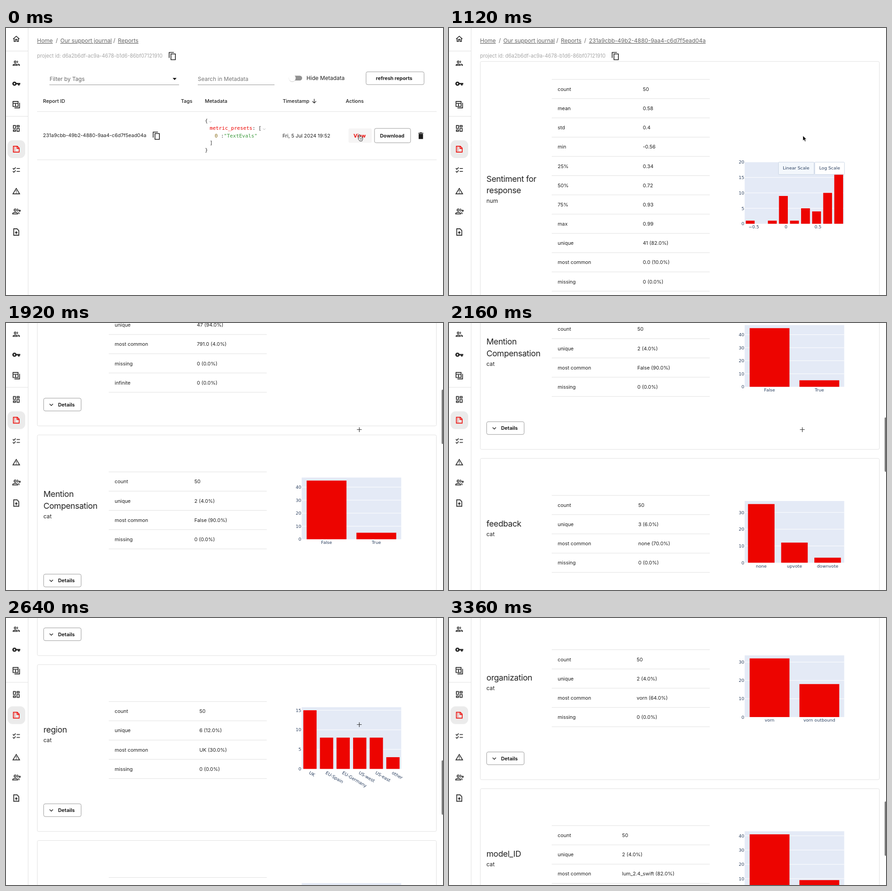
Recreate the animation shown at these times as an HTML page. Size 957x585 px, loop 3440 ms.

```html
<!DOCTYPE html>
<html lang="en">
<head>
<meta charset="utf-8">
<title>Reports</title>
<style>
  html, body { margin: 0; width: 100%; height: 100%; overflow: hidden; background: #fff; }
  svg { display: block; }
  text { font: 10.9px Inter, sans-serif; fill: #212121; white-space: pre; }
  .body { font-size: 12.1px; }
  .crumb { font-size: 12.3px; fill: #666; }
  .link { text-decoration: underline; }
  .id { font-size: 11.05px; fill: #a6a6a6; }
  .head { font-weight: 500; }
  .bold { font-weight: 700; }
  .title { font-size: 17.9px; letter-spacing: -.35px; }
  .sub { font-size: 12.2px; }
  .code { font: 11.1px "DejaVu Sans Mono", monospace; }
  .tick { font: 9.5px "DejaVu Sans", sans-serif; fill: #2a3f5f; }
  .hover { font: 10.3px "Liberation Sans", sans-serif; fill: #fff; }
  .mid { text-anchor: middle; }
  .end { text-anchor: end; }
  .rule { stroke: #e0e0e0; }
  .box { fill: none; stroke: #e0e0e0; }
  .button { fill: #fff; stroke: #999; }
  .icon { fill: none; stroke: #1c1c1c; stroke-width: 2; }
  .solid { fill: #1c1c1c; stroke: none; }
</style>
</head>
<body>
<svg id="stage" width="957" height="585" viewBox="0 0 957 585"></svg>
<script>
const LOOP = 3440, STEP = 80, OPEN = 1120, SCROLL_START = 1440;
const RED = '#ed0400', ROW = 42.18, GAP = 19.7;
const REPORT = '231a9cbb-49b2-4880-9aa4-c6d7f5ead04a';

const text = (x, y, str, cls = '', extra = '') => `<text x="${x}" y="${y}" class="${cls}" ${extra}>${str}</text>`;
const rect = (x, y, w, h, extra) => `<rect x="${x}" y="${y}" width="${w}" height="${h}" ${extra}/>`;
const rule = (x1, x2, y, extra = '') => `<path class="rule" d="M${x1} ${y}H${x2}" ${extra}/>`;
const path = (d, extra = '') => `<path d="${d}" ${extra}/>`;
const icon = (cx, cy, body, extra = '', scale = .7955) =>
  `<g class="icon" transform="translate(${cx - 12 * scale} ${cy - 12 * scale}) scale(${scale})" ${extra}>${body}</g>`;
const button = (x, y, w, h, label, tx) =>
  rect(x, y, w, h, 'rx="3.5" class="button"') + text(tx, y + h / 2 + 4, label, 'bold');

const copyIcon = path('M3 17V2h13M8 6h12v16H8z');

// Sidebar
const sideIcons = [
  [24, path('M3.5 12L12 4.4 20.5 12M6 10.5V19h4v-6h4v6h4v-8.5')],
  [77, '<circle cx="9" cy="8.5" r="2.5"/>' + path('M3 18v-.8c0-1.7 4-2.5 6-2.5s6 .8 6 2.5v.8zM14 6a2.6 2.6 0 0 1 0 5M16.5 14.7c2.5.5 4.5 1.3 4.5 3.3h-3')],
  [122, '<circle cx="7" cy="12" r="4" stroke-width="3.6"/>' + path('M12 10H23v4h-2v3h-4v-3h-5z', 'class="solid"')],
  [168, path('M3 3h14v14H3zM3 8.5h14M10 8.5V17M21 7v14H7')],
  [220, path('M4 4h6v8H4zM14 4h6v4h-6zM4 16h6v4H4zM14 12h6v8h-6z')],
  [265.5, path('M4 4h11l5 5v11H4zM14 4v6h6M7 8h2M7 12h2M7 16h2'), `style="stroke:${RED}"`],
  [311, path('M2.5 7.5l2.8 2.8 5-5M2.5 15.5l2.8 2.8 5-5M13 8h9M13 16h9')],
  [357, path('M12 5L2.8 20h18.4zM12 10v4M12 16v2')],
  [402, '<circle cx="9" cy="8" r="3"/>' + path('M2 19v-1.3c0-2 4.500-3 7-3s7 1 7 3V19zM14 5a3 3 0 0 1 0 6M17.500 14.500c1.500.6 2.500 1.600 2.500 4.500M18.500 10h6M21.500 7v6')],
  [447, path('M5 3h9l5 5v13H5zM12 18v-6M8.700 14.500L12 11.200l3.300 3.300')],
];
const sidebar = rule(0, 48, 50.5) + rule(0, 48, 193.5) +
  rect(3.5, 246, 38.5, 39, 'rx="11" fill="#ebebeb"') +
  sideIcons.map(([y, body, extra]) => icon(22.5, y, body, extra)).join('');

// Header shared by both pages
const header = text(68, 32, 'Home', 'crumb link') + text(109, 32, '/', 'crumb') +
  text(119, 32, 'Our support journal', 'crumb link') + text(235, 32, '/', 'crumb') +
  text(245, 32, 'Reports', 'crumb link') +
  text(68, 65, 'project id: d6a2b6df-ac9a-4678-b1d6-86bf07121910', 'id') + icon(364.5, 61.5, copyIcon);

// Report list
const code = (x, y, str, color = '#333') => text(x, y, str, 'code', `style="fill:${color}"`);
const fold = (x, y) => path(`M${x - 2.5} ${y - 1.2}l2.500 2.500 2.500-2.500`, 'fill="none" stroke="#aaa"');
const list =
  text(95.5, 115.5, 'Filter by Tags', 'body', 'style="fill:#666"') + rule(95, 379, 124.5, 'style="stroke:#949494"') +
  path('M365 109.500h8.500l-4.250 4.500z') +
  text(420, 115.5, 'Search in Metadata', 'body', 'style="fill:#777"') + rule(420, 588, 124.5, 'style="stroke:#949494"') +
  rect(622, 104.500, 26.500, 10.500, 'rx="5.250" fill="#919191"') +
  '<circle cx="627" cy="110.600" r="7.600" fill="#000" opacity=".2"/><circle cx="627" cy="109.800" r="7.500" fill="#fff"/>' +
  text(658, 114, 'Hide Metadata', 'body') +
  button(788.5, 96, 127, 28, 'refresh reports', 810) +
  [[81, 'Report ID'], [383, 'Tags'], [435.5, 'Metadata'], [606, 'Timestamp'], [744, 'Actions']]
    .map(([x, label]) => text(x, 163.700, label, 'head')).join('') +
  icon(675, 160, path('M12 4v15M5 12.500l7 7 7-7'), '', .6) +
  rule(68, 943, 183) + rule(68, 943, 288.8) +
  text(81, 239.300, REPORT) + icon(329.500, 236, copyIcon) +
  code(435.500, 207, '{') + fold(447.500, 205.500) +
  code(446, 223, 'metric_presets', RED) + code(539.500, 223, ': [') + fold(565.500, 221.500) +
  code(457, 239.500, '0', '#8a6d1b') + code(470.500, 239.500, ':') + code(477, 239.500, '"TextEvals"', '#3d9a3d') +
  code(446, 255, ']') + code(435.500, 271, '}') +
  text(605.500, 239.500, 'Fri, 5 Jul 2024 19:52') +
  rect(750, 220, 51, 31.500, 'rx="3.500" fill="#f6f5f5"') +
  rect(750, 220, 51, 31.500, `id="ripple" rx="3.500" fill="${RED}" opacity="0"`) +
  text(761, 240, 'View', 'bold', `style="fill:${RED}"`) +
  button(807, 220, 79, 31.500, 'Download', 819) +
  icon(908.500, 236, path('M6 7h12v14H6zM5 4h14v2H5zM9 3h6v1H9z', 'class="solid"'));

// Report cards
const NUM_KEYS = ['count', 'mean', 'std', 'min', '25%', '50%', '75%', 'max', 'unique', 'most common', 'missing', 'infinite'];
const CAT_KEYS = ['count', 'unique', 'most common', 'missing'];
const cards = [
  { title: ['Sentiment for', 'response'], x: 424.5, step: 5, bars: [1, 0, 1, 9, 1, 5, 4, 10, 19],
    values: '50|0.58|0.4|-0.56|0.34|0.72|0.93|0.99|41 (82.0%)|0.0 (10.0%)|0 (0.0%)|0 (0.0%)',
    axis: [[667.5, '−0.5'], [738, '0'], [808, '0.5']] },
  { title: ['Text Length for', 'response'], x: 418, step: 5, bars: [16, 4, 13, 6, 5, 0, 1, 4, 1],
    values: '50|713.86|404.17|259.0|323.25|671.5|908.25|1833.0|47 (94.0%)|791.0 (4.0%)|0 (0.0%)|0 (0.0%)',
    axis: [[692.5, '500'], [762, '1000'], [831, '1500']] },
  { title: ['Mention', 'Compensation'], x: 412.5, step: 10, bars: [45, 5], labels: ['False', 'True'],
    values: '50|2 (4.0%)|False (90.0%)|0 (0.0%)' },
  { title: ['feedback'], x: 414.5, step: 10, bars: [35, 12, 3], labels: ['none', 'upvote', 'downvote'],
    values: '50|3 (6.0%)|none (70.0%)|0 (0.0%)', tip: 1 },
  { title: ['region'], x: 423.5, step: 5, bars: [15, 8, 8, 8, 8, 3], tilt: true,
    labels: ['UK', 'EU-Spain', 'EU-Germany', 'US-west', 'US-east', 'other'],
    values: '50|6 (12.0%)|UK (30.0%)|0 (0.0%)' },
  { title: ['organization'], x: 411, step: 10, bars: [32, 18], labels: ['vorn', 'vorn outbound'],
    values: '50|2 (4.0%)|vorn (64.0%)|0 (0.0%)' },
  { title: ['model_ID'], x: 379, step: 10, bars: [41, 9], labels: ['lum_2.4_swift', 'lum_2.4_large'],
    values: '50|2 (4.0%)|lum_2.4_swift (82.0%)|0 (0.0%)' },
];

function chart(card, mid) {
  const left = 647.5, width = 218, top = mid - 72, base = mid + 63.2;
  const max = Math.max(...card.bars), unit = 128.5 / max, slot = width / card.bars.length;
  let out = rect(left, top, width, base - top, 'fill="#e4eaf6"');
  for (let v = 0; v <= max * 20 / 19 + .01; v += card.step) {
    const y = base - v * unit;
    if (v) out += path(`M${left} ${y}h${width}`, 'stroke="#fff"');
    out += text(646.5, y + 3.5, v, 'tick end');
  }
  card.bars.forEach((v, i) => {
    const x = left + slot * (i + .1), center = left + slot * (i + .5), y = base - v * unit;
    out += rect(x, y, slot * .8, v * unit, `fill="${RED}"`);
    if (card.tilt) out += text(center - 3, base + 10.5, card.labels[i], 'tick', `transform="rotate(30 ${center - 3} ${base + 10.5})"`);
    else if (card.labels) out += text(center, base + 10.3, card.labels[i], 'tick mid');
    if (card.tip === i) out += `<g id="tip" opacity="0">` +
      path(`M${x + slot * .8 + .5} ${y}l4.500-4v-4h60v15.500h-60v-3.500z`, `fill="${RED}" stroke="#fff" stroke-width=".8"`) +
      text(820, y + 3.8, '(upvote, 12)', 'hover mid') + '</g>';
  });
  if (card.axis) {
    out += card.axis.map(([x, label]) => text(x, base + 10.3, label, 'tick mid')).join('') +
      rect(721.5, top + .3, 78, 27, 'rx="1.5" fill="#f3f7fc" stroke="#c8d4e3"') + text(760, top + 16.5, 'Linear Scale', 'tick mid') +
      rect(801, top + .3, 65, 27, 'rx="1.5" fill="#fff" stroke="#c8d4e3"') + text(833.5, top + 16.5, 'Log Scale', 'tick mid');
  }
  return out;
}

function drawCard(card, top) {
  const numeric = !!card.axis, keys = numeric ? NUM_KEYS : CAT_KEYS, values = card.values.split('|');
  const first = top + (numeric ? 39.3 : 81), last = first + ROW * keys.length, mid = (first + last) / 2;
  const height = last + (numeric ? 73.8 : 116) - top;
  const lift = card.title.length > 1 ? 0 : 12.9;
  const detailsY = last + (numeric ? 13 : 55.3);
  let out = rect(68.5, top, 874, height, 'rx="3" class="box"');
  for (let i = 0; i <= keys.length; i++) out += rule(225, 571, first + ROW * i);
  keys.forEach((key, i) => {
    const y = first + ROW * i + 25.2;
    out += text(238, y, key) + text(card.x, y, values[i]);
  });
  card.title.slice().reverse().forEach((line, i) => out += text(82, mid - 3.6 - lift - 25.5 * i, line, 'title'));
  out += text(82, mid + 17.4 - lift, numeric ? 'num' : 'cat', 'sub') + chart(card, mid) +
    button(82.5, detailsY, 82, 28, 'Details', 114) +
    path(`M95.500 ${detailsY + 12.500}l3.700 3.700 3.700-3.700`, 'fill="none" stroke="#222" stroke-width="1.4"');
  return [out, top + height + GAP];
}

let top_ = 73.3;
let report = text(296, 32, '/', 'crumb') + text(306.5, 32, REPORT, 'crumb link');
for (const card of cards) {
  const [markup, next] = drawCard(card, top_);
  report += markup;
  top_ = next;
}

// Pointers
const arrow = path('M775 236v11l2.600-2.300 1.800 4 2-.9-1.800-3.900h3.400z', 'stroke="#fff" stroke-width=".8"');
const cross = path('M768.500 233.500h10.500M773.700 228.500v10.500', 'stroke="#333" stroke-width="1.200"');
const hand = path('M773 242v-7q0-1.500 1.200-1.500t1.200 1.500v3.500q4-.3 5.600 1.500v4q-.5 1.500-1.300 3.500h-5.200q-1-2-3.800-5 .5-1.500 2.300-.5zM776.200 241.500v3M778.300 241.500v3',
  'fill="#fff" stroke="#222" stroke-width="1"');

document.getElementById('stage').innerHTML =
  `<g id="page">${header}<g id="list">${list}</g><g id="report">${report}</g></g>` +
  rect(0, 0, 48, 585, 'fill="#fff"') + path('M48.500 0V585', 'class="rule"') + `<g id="sidebar">${sidebar}</g>` +
  rect(954, 0, 6, 119, 'id="thumb" rx="2" fill="#7d7d7d"') +
  `<g id="hand">${hand}</g><g id="arrow">${arrow}</g><g id="cross">${cross}</g>`;

// Motion: each entry holds its value until the next one
function play(id, prop, steps) {
  const frames = steps.map(([t, value]) => ({ offset: t / LOOP, [prop]: value, easing: 'steps(1, end)' }));
  frames.push({ offset: 1, [prop]: steps[steps.length - 1][1] });
  document.getElementById(id).animate(frames, { duration: LOOP, iterations: Infinity });
}
const show = (id, from, to) => play(id, 'opacity',
  [...(from ? [[0, 0]] : []), [from, 1], ...(to < LOOP ? [[to, 0]] : [])]);
const move = (id, offset) => play(id, 'transform', [[0, 0], ...scroll].map(([t, s]) => [t, `translateY(${offset(s)}px)`]));

const scroll = [140, 360, 555, 725, 870, 995, 1106, 1210, 1320, 1440, 1550, 1640, 1710, 1769,
  1880, 2020, 2160, 2282, 2385, 2465, 2519].map((s, i) => [SCROLL_START + i * STEP, s]);

move('page', s => -s);
move('sidebar', s => -Math.min(s, 52.5));
move('thumb', s => -54 + .181 * s);
show('thumb', SCROLL_START, LOOP);
show('list', 0, OPEN);
show('report', OPEN, LOOP);
show('hand', 0, OPEN);
show('arrow', OPEN, 1680);
show('cross', 1680, 3360);
show('tip', 2400, 2560);
play('ripple', 'opacity', [[0, 0], [480, .06], [560, .1], [640, .03], [OPEN, 0]]);
</script>
</body>
</html>
```
